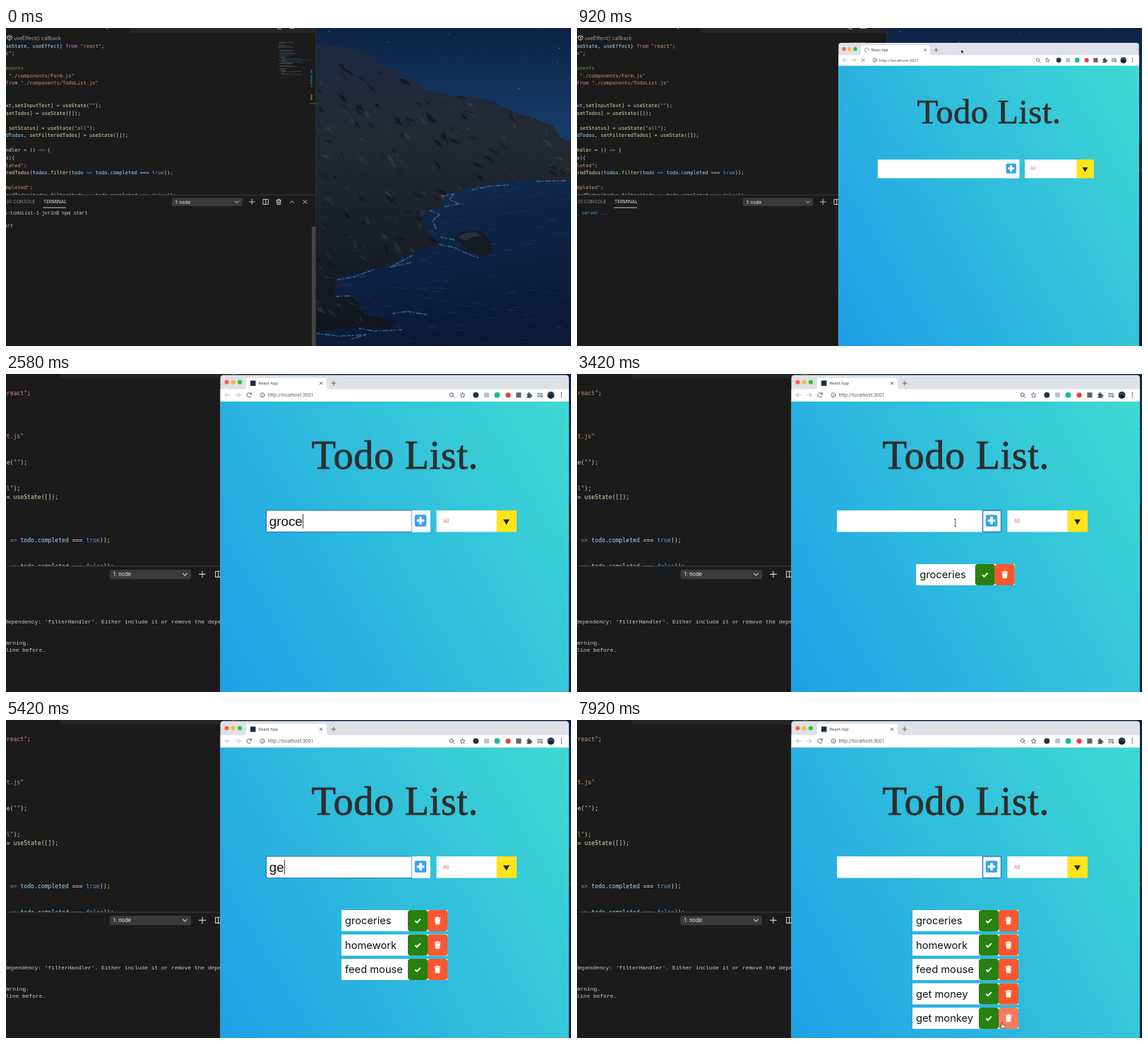
An HTML page that plays this animation: 800x450 px, repeating every 8 s.

```html
<!DOCTYPE html>
<html lang="en">
<head>
<meta charset="utf-8">
<title>Todo List</title>
<style>
  html, body { margin: 0; width: 100%; height: 100%; overflow: hidden; background: #000; }
  svg { display: block; width: 100vw; height: 100vh; }
  text { white-space: pre; }
  .code { font: 7.02px "DejaVu Sans Mono", monospace; }
  .term { font: 6.78px "Liberation Mono", monospace; fill: #ccc; }
  .ui { font-family: Inter, sans-serif; }
  .chrome { font-family: Roboto, sans-serif; }
  .line { fill: none; stroke-linecap: round; stroke-linejoin: round; }
</style>
</head>
<body>
<svg viewBox="0 0 800 450" preserveAspectRatio="none">
  <defs>
    <linearGradient id="sky" x2="0" y2="1">
      <stop offset="0" stop-color="#0c2345"/><stop offset=".6" stop-color="#163a68"/><stop offset="1" stop-color="#1a3f6c"/>
    </linearGradient>
    <linearGradient id="sea" x2=".3" y2="1">
      <stop offset="0" stop-color="#142f54"/><stop offset=".4" stop-color="#0e2547"/><stop offset="1" stop-color="#0a1a36"/>
    </linearGradient>
    <linearGradient id="slope" x2="0" y2="1">
      <stop offset="0" stop-color="#1c2a40"/><stop offset=".35" stop-color="#232932"/><stop offset="1" stop-color="#10151e"/>
    </linearGradient>
    <linearGradient id="page" gradientUnits="userSpaceOnUse" x1="274" y1="410" x2="826" y2="90">
      <stop offset="0" stop-color="#1e9fe7"/><stop offset="1" stop-color="#3fd9d3"/>
    </linearGradient>
    <clipPath id="land"><use href="#coast"/></clipPath>
    <clipPath id="editorClip"><rect width="439" height="236"/></clipPath>
    <clipPath id="panelClip"><rect y="236" width="433" height="214"/></clipPath>
    <path id="tick" d="M-3.7 .3l2.5 2.5 5-5.2" fill="none" stroke="#fff" stroke-width="2"/>
    <path id="bin" fill="#fff" d="M-4.3-4.6h2.4l.8-.9h2.2l.8.9h2.4v1.3h-8.6zM-3.7-2.7h7.4l-.5 7q-.1 1-1 1h-4.4q-.9 0-1-1z"/>
  </defs>

  <g id="camera">
    <g id="wallpaper">
      <rect x="430" width="370" height="225" fill="url(#sky)"/>
      <g id="stars" fill="#b9cde4"></g>
      <rect x="430" y="210" width="370" height="240" fill="url(#sea)"/>
      <g id="ripples" fill="#274a76" opacity=".35"></g>
      <path id="coast" fill="url(#slope)" d="M430 22L455 25 478 27 507 34 532 52 562 64 590 85 626 95 660 97 690 103 715 117 745 127 774 138 786 156 800 160V216L752 214 700 217 652 227 622 236 616 252 590 262 594 288 613 304 575 318 535 338 470 352 464 378 492 382 508 405 550 414 546 426 500 424 430 430z"/>
      <g id="rocks" clip-path="url(#land)"></g>
      <path fill="#151a23" d="M635 296l9-6 18-4 13 3 8 10 7 18-13 6-17-5-15-11z"/>
      <path fill="#2b3038" d="M640 296l10-6 17-1 6 6-13 1-9 5z"/>
      <g class="line" stroke="#86a4c4" stroke-opacity=".4" stroke-width="1.8" stroke-dasharray="4 3 1 4 7 3">
        <path d="M618 238l16-3-6 8 14 6-22 4M600 258l14 6-10 8 6 14M616 296l20 4M614 306l22 5 12 6 20 8M575 322l-30 16 28-6M470 356l24-4 26-10M468 380l18-1M500 425l20 4 40-2M440 432l30 4 40-2-20 6M548 404l20-3 30 5M752 217l40-1M660 229l24-5 30-2"/>
      </g>
    </g>

    <g id="editor">
      <rect width="438.5" height="450" fill="#1b1b1b"/>
      <rect x="175" width="263.5" height="7" fill="#252526"/>
      <g class="line" stroke="#c5c5c5" stroke-width=".9">
        <path d="M384 0l2 2 2-2M389 0v2M402 .4h7M142 0l2 1M2 11.8l3-1.6 3 1.6v3.8l-3 1.7-3-1.7zM2 11.8l3 1.6 3-1.6M5 13.4v3.9"/>
      </g>
      <text class="ui" x="11" y="16.6" font-size="7.1" fill="#a5a5a5">useEffect() callback</text>
      <g id="code" class="code" clip-path="url(#editorClip)"></g>
      <g id="minimap" opacity=".6"></g>
      <path d="M431.5 59h2v5h-2zM431.5 66h2v14h-2zM431.5 81h2v3h-2z" fill="#17647a"/>
      <path d="M431.5 94h2v8h-2z" fill="#7d7415"/>
      <path d="M431 107h8" stroke="#777" stroke-width=".8"/>

      <rect y="236" width="438.5" height="214" fill="#1b1b1b"/>
      <path d="M0 236.2h438.5" stroke="#444" stroke-width=".8"/>
      <g class="ui" font-size="6.5">
        <text x="41.5" y="248.4" text-anchor="end" fill="#8b8b8b">DEBUG CONSOLE</text>
        <text x="53" y="248.4" fill="#e7e7e7">TERMINAL</text>
        <rect x="235" y="240.5" width="99.5" height="11.5" rx="1.5" fill="#3a3a3a"/>
        <text x="239.5" y="248.7" fill="#eee">1: node</text>
      </g>
      <g class="line" stroke="#d0d0d0" stroke-width=".95">
        <path d="M53 254.2h31.5M324.5 245l2.5 2.6 2.5-2.6M344.5 246h7.5M348.2 242.3v7.5M364.3 242.5h7v7h-7zM367.8 242.5v7M382.7 243.7h6.8M383.5 244l.4 5.7h4.4l.4-5.7M385 243.3v-1h2.2v1M385.2 245.5v2.7M387 245.5v2.7M402.3 247.5l2.8-2.8 2.8 2.8M421 243.5l5 5M426 243.5l-5 5"/>
      </g>
      <rect x="433" y="281" width="5.5" height="169" fill="#454545"/>
      <path d="M438.9 0V450" stroke="#333" stroke-width=".8"/>
      <g class="term" clip-path="url(#panelClip)">
        <g id="prompt">
          <text x="-2" y="264.4">s:todoList-1 jorin$ npm start</text>
          <text x="10" y="281.6" text-anchor="end">react-scripts start</text>
        </g>
        <text id="starting" x="43" y="264.4" text-anchor="end" fill="#2f9fd0">Starting the development server...</text>
        <g id="warnings">
          <text x="74.5" y="306.4">missing dependency: 'filterHandler'. Either include it or remove the dependency array</text>
          <text x="137" y="332" text-anchor="end">Search for the keywords to learn more about each warning.</text>
          <text x="157" y="340.5" text-anchor="end">To ignore, add // eslint-disable-next-line to the line before.</text>
        </g>
      </g>
    </g>

    <g transform="scale(.862069) translate(126 2)">
      <g id="browser">
        <path d="M303.5 560V6q0-4.5 4.5-4.5H792.5q4.5 0 4.5 4.5V560z" fill="#dee1e6"/>
        <path d="M337 21.5q3 0 3-3V9q0-3.5 3.5-3.5H450.5q3.5 0 3.5 3.5V18.5q0 3 3 3H797V39H303.5V21.5z" fill="#fff"/>
        <circle cx="312.5" cy="11.5" r="3.1" fill="#ff5f57"/>
        <circle cx="321.7" cy="11.5" r="3.1" fill="#f6bb2f"/>
        <circle cx="331" cy="11.5" r="3.1" fill="#2bc440"/>
        <rect id="favicon" x="346" y="9.3" width="7.5" height="7.5" fill="#1f2d3a"/>
        <path id="spinner" class="line" d="M349.7 9.8a3.3 3.3 0 1 0 3.3 3.3" stroke="#8a8f96"/>
        <g class="chrome">
          <text x="357.5" y="15.3" font-size="6" fill="#45494d">React App</text>
          <text x="370.5" y="32.4" font-size="7" fill="#5f6368">http://localhost:3001</text>
        </g>
        <g class="line" stroke="#55595e" stroke-width=".95">
          <path d="M444.3 11.3l3.6 3.6M447.9 11.3l-3.6 3.6M461 13h6M464 10v6"/>
          <path d="M317 29.8h-6.5M313.3 26.9l-2.9 2.9 2.9 2.9M325.5 29.8h6.5M329.2 26.9l2.9 2.9-2.9 2.9" stroke="#b5b8bc"/>
          <path id="reload" d="M347 28.2a3.2 3.2 0 1 0 .2 2.6M347.3 26.4v2.2h-2.2"/>
          <path id="stop" d="M341.5 27.3l5 5M346.5 27.3l-5 5"/>
          <circle cx="363" cy="29.8" r="3.1" stroke-width=".8"/>
          <path d="M363 29.6v1.7M363 28.1v.1M633 31.5l2 2"/>
          <circle cx="630.8" cy="29.3" r="2.5"/>
          <path d="M646.5 26.4l1 2.3 2.5.2-1.9 1.7.6 2.5-2.2-1.3-2.2 1.3.6-2.5-1.9-1.7 2.5-.2z" stroke-width=".8"/>
          <path d="M752.5 27.5h7M752.5 29.8h7M752.5 32h4M758.5 31l1.5 1-1.5 1z"/>
        </g>
        <circle cx="665.3" cy="29.8" r="4" fill="#30343a"/>
        <rect x="677" y="26.3" width="7" height="7" rx="1" fill="#bfc2c5"/>
        <circle cx="695.5" cy="29.8" r="4" fill="#19bd94"/>
        <circle cx="711" cy="29.8" r="3.6" fill="#df4436"/>
        <rect x="722.3" y="26.2" width="7.2" height="7.2" fill="#62666c"/>
        <path d="M737.5 27.7h2q-.5-1.9 1-1.9t1 1.9h2v2q1.9-.5 1.9 1t-1.9 1v2h-6v-2q1.5-.5 1.5-1t-1.5-1z" fill="#494d52"/>
        <circle cx="771.5" cy="29.8" r="5" fill="#27405f"/>
        <path d="M767 31.5l4-3 5 3.5q-1.5 2.8-4.5 2.8t-4.5-3.3z" fill="#11202f"/>
        <g fill="#55595e"><circle cx="786.5" cy="27" r=".9"/><circle cx="786.5" cy="29.8" r=".9"/><circle cx="786.5" cy="32.6" r=".9"/></g>

        <rect x="303.5" y="39" width="493.5" height="521" fill="url(#page)"/>
        <text x="432.5" y="133.5" font-family="Liberation Serif, serif" font-size="56.5" letter-spacing=".5" fill="#2e2e2e" stroke="#2e2e2e" stroke-width=".8">Todo List.</text>
        <rect x="368" y="193" width="232.5" height="30.5" fill="#fff"/>
        <rect id="field" x="368.5" y="193" width="206" height="30.5" rx="1" fill="#fff" stroke="#2f6fb8" stroke-width="1.2"/>
        <text id="typed" x="372.8" y="214.6" font-family="Liberation Sans, sans-serif" font-size="18.8" fill="#111"></text>
        <path id="caret" stroke="#222" stroke-width=".9"/>
        <rect id="add" x="574.5" y="193" width="26" height="30.5" rx="1" stroke-width="1.4"/>
        <rect id="addIcon" x="578.8" y="199.3" width="16.4" height="16.4" rx="2"/>
        <path id="addPlus" d="M587 202.3v10.4M581.8 207.5h10.4" stroke-width="3.6"/>
        <rect x="609.5" y="193" width="86" height="30.5" fill="#fff"/>
        <text class="ui" x="618.7" y="210.7" font-size="7.4" fill="#d8725a">All</text>
        <rect x="694.5" y="193" width="28.5" height="30.5" fill="#ffe41c"/>
        <path d="M704 205.7h9l-4.5 7.6z" fill="#222"/>
        <g id="list" class="ui" font-size="14.7" fill="#111"></g>
      </g>
      <g id="cursor" stroke="#fff" stroke-width=".7" fill="#000">
        <path id="arrow" d="M0 0v7l1.7-1.5 1.1 2.4 1.1-.5-1.1-2.3h2.2z"/>
        <path id="beam" d="M-1.5-5h3M0-5v10M-1.5 5h3" stroke="#222"/>
        <path id="hand" d="M-1-3.5q1-1 1.7 0v2.7l3 .7q.8.3.6 1.3l-.8 3h-4.2l-2.3-3.2q.4-.9 1.3-.2l.7.5z" fill="#fff" stroke="#111"/>
      </g>
    </g>
  </g>
</svg>

<script>
const LOOP = 8000;
const OPENED = 700, LOADED = 1000;      // browser window
const DRAG_START = 940, DRAG_END = 1130; // window pulled up
const ZOOM_START = 952, ZOOM_TIME = 500;

const $ = id => document.getElementById(id);
const esc = s => s.replace(/&/g, "&amp;").replace(/</g, "&lt;").replace(/>/g, "&gt;");
const clamp = v => Math.max(0, Math.min(1, v));
const ease = u => 0.5 - 0.5 * Math.cos(Math.PI * clamp(u));
const show = (id, on) => $(id).setAttribute("visibility", on ? "inherit" : "hidden");
const set = (id, attrs) => { for (const k in attrs) $(id).setAttribute(k, attrs[k]); };
const repeat = (n, make) => Array.from({ length: n }, (_, i) => make(i)).join("");

let seed = 11;
const rnd = (a, b) => a + (b - a) * ((seed = (seed * 16807) % 2147483647) / 2147483647);

// Wallpaper details
const tones = ["#0c1017", "#1c222c", "#2c3138", "#3a3d42", "#11161f"];
$("stars").innerHTML = repeat(26, () =>
  `<circle cx="${rnd(440, 798)}" cy="${rnd(0, 90)}" r="${rnd(0.25, 0.6)}"/>`);
$("ripples").innerHTML = repeat(160, () =>
  `<ellipse cx="${rnd(440, 800)}" cy="${rnd(222, 450)}" rx="${rnd(2, 9)}" ry="${rnd(0.3, 0.8)}"/>`);
$("rocks").innerHTML = repeat(380, i => {
  const w = rnd(5, 18), h = rnd(3, 12);
  return `<path d="M${rnd(430, 800)} ${rnd(45, 430)}l${w * 0.6} ${h * rnd(0, 0.6)} ${w * 0.4} ${h}-${w * rnd(0.3, 0.8)}-${h * 0.4}z" fill="${tones[i % 5]}" opacity=".6"/>`;
});

// Source code with syntax colours
const source = `import React, {useState, useEffect} from "react";
import "./App.css";

//Importing Components
import Form from "./components/Form.js"
import TodoList from "./components/TodoList.js"


  const [inputText,setInputText] = useState("");
  const [todos, setTodos] = useState([]);

  const [status, setStatus] = useState("all");
  const [filteredTodos, setFilteredTodos] = useState([]);

  const filterHandler = () => {
    switch(status){
      case "completed":
        setFilteredTodos(todos.filter(todo => todo.completed === true));
        break;
      case "uncompleted":
        setFilteredTodos(todos.filter(todo => todo.completed === false));`.split("\n");
const token = /(\/\/.*)|("[^"]*")|\b(import|from|switch|case|break)\b|(\b(?:const|true|false)\b|=>)|(set[A-Z]\w*|filterHandler|\w+(?=\())|(\w+)|[^\w"]/g;
const inks = ["#6a9955", "#ce9178", "#c586c0", "#569cd6", "#dcdcaa", "#9cdcfe"];
const paint = line => line.replace(token, (s, ...g) => {
  const i = g.slice(0, 6).findIndex(Boolean);
  return `<tspan fill="${inks[i] || "#d4d4d4"}">${esc(s)}</tspan>`;
});
$("code").innerHTML = source.map((line, i) =>
  `<text x="-68" y="${27.5 + 10.57 * i}">${paint(line)}</text>`).join("");
$("minimap").innerHTML = source.concat(source.slice(8)).map((line, i) => {
  const indent = line.search(/\S/);
  return indent < 0 ? "" : `<rect x="${386 + indent * 0.5}" y="${20 + i * 1.38}" width="${(line.length - indent) * 0.45}" height=".7" fill="${i % 4 ? "#4d7288" : "#6d6a60"}"/>`;
}).join("") + '<path d="M386 45.5h46" stroke="#1d5573"/>';

// Each task: text, typing start, ms per letter, time it is added
const tasks = [
  ["groceries", 2270, 60, 3120],
  ["homework", 4090, 48, 4560],
  ["feed mouse", 4640, 48, 5200],
  ["get money", 5280, 48, 5790],
  ["get monkey", 5870, 48, 6430]
].map(([text, start, pace, added]) => ({ text, start, pace, added }));
const fieldAt = [440, 208], plusAt = [587, 212];

// Pointer stops: time, x, y
const stops = [[OPENED, 560, 130], [880, 505, 33], [DRAG_START, 505, 33], [DRAG_END, 505, 13],
  [1395, ...fieldAt], [2850, ...fieldAt], [3060, ...plusAt], [3300, ...plusAt], [3600, ...fieldAt]];
tasks.slice(1).forEach(({ added }, i) => {
  stops.push([added - 80, ...fieldAt], [added - 40, ...plusAt]);
  if (i < 3) stops.push([added + 40, ...plusAt], [added + 70, ...fieldAt]);
});
stops.push([6900, ...plusAt], [7750, 602, 432]);

function pointer(t) {
  const i = stops.findIndex(s => s[0] > t);
  if (i < 0) return stops[stops.length - 1].slice(1);
  if (i === 0) return stops[0].slice(1);
  const [a, b] = [stops[i - 1], stops[i]], e = ease((t - a[0]) / (b[0] - a[0]));
  return [a[1] + (b[1] - a[1]) * e, a[2] + (b[2] - a[2]) * e];
}

let listKey = "";
function drawList(count, hot) {
  const key = count + "/" + hot;
  if (key === listKey) return;
  listKey = key;
  const width = [0, 139.5, 141, 150, 150, 150][count];
  const left = 550 - width / 2, right = 550 + width / 2;
  $("list").innerHTML = tasks.slice(0, count).map(({ text }, i) => {
    const y = 269 + 34.5 * i;
    return `<rect x="${left}" y="${y}" width="${width}" height="30" fill="#fff"/>
      <text x="${left + 5}" y="${y + 20.4}">${text}</text>
      <rect x="${right - 56}" y="${y}" width="28" height="30" rx="4" fill="#27800f"/>
      <rect x="${right - 28}" y="${y}" width="28" height="30" rx="4" fill="${hot && i === 4 ? "#fb7a5d" : "#ff562f"}"/>
      <use href="#tick" x="${right - 42}" y="${y + 15}"/><use href="#bin" x="${right - 14}" y="${y + 15}"/>`;
  }).join("");
}

// The scale grows evenly while the centre of the screen eases to its place
function moveCamera(t) {
  const u = clamp((t - ZOOM_START) / ZOOM_TIME), e = ease(u);
  const zoom = 1 + 0.16 * u;
  const x = 400 - 62 * e - 400 * zoom, y = 225 + 34 * e - 225 * zoom;
  set("camera", { transform: `matrix(${zoom} 0 0 ${zoom} ${x} ${y})` });
}

function render(t) {
  moveCamera(t);

  const open = t >= OPENED, loading = t < LOADED;
  show("prompt", t < 300);
  show("starting", t >= 300 && loading);
  show("warnings", !loading);
  show("browser", open);
  const lift = 1 - ease((t - DRAG_START) / (DRAG_END - DRAG_START));
  set("browser", { transform: `translate(0 ${21 * lift})` });
  for (const id of ["spinner", "stop"]) show(id, open && loading);
  for (const id of ["favicon", "reload"]) show(id, !loading);
  set("spinner", { transform: `rotate(${t * 0.5} 349.7 13.1)` });

  const [x, y] = pointer(t);
  const task = tasks.find(k => t >= k.start && t < k.added);
  const letters = task ? Math.floor((t - task.start) / task.pace) : 0;
  const count = tasks.filter(k => t >= k.added).length;
  const onPlus = x > 574 && x < 601 && y > 193 && y < 224;
  const onBin = x > 597 && y > 408;
  const waiting = (t >= 1450 && count === 0) || (t >= 3620 && count === 1);
  const focused = !!task || waiting;

  const typed = task ? task.text.slice(0, letters) : "";
  if ($("typed").textContent !== typed) $("typed").textContent = typed;
  show("field", focused);
  show("caret", focused && (!!task || t % 1000 < 500));
  const end = 373 + (typed ? $("typed").getComputedTextLength() : 0);
  set("caret", { d: `M${end + 0.6} 198V218.5` });

  const ring = count > 0 && !focused;
  set("add", { fill: onPlus ? "#27800f" : "#f8fbfe", stroke: ring ? (onPlus ? "#a5cdf0" : "#2f78cc") : "none" });
  set("addIcon", { fill: onPlus ? "#fff" : "#35a2ec" });
  set("addPlus", { stroke: onPlus ? "#27800f" : "#fff" });
  drawList(count, onBin);

  const busy = task && t < task.start + task.text.length * task.pace + 20;
  const seen = open && !busy;
  const hand = onPlus || onBin;
  const beam = !hand && x < 574 && y > 193 && y < 224;
  set("cursor", { transform: `translate(${x} ${y})` });
  show("hand", seen && hand);
  show("beam", seen && beam);
  show("arrow", seen && !hand && !beam);
}

const begin = performance.now();
function tick() {
  render((performance.now() - begin) % LOOP);
  requestAnimationFrame(tick);
}
tick();
</script>
</body>
</html>
```
